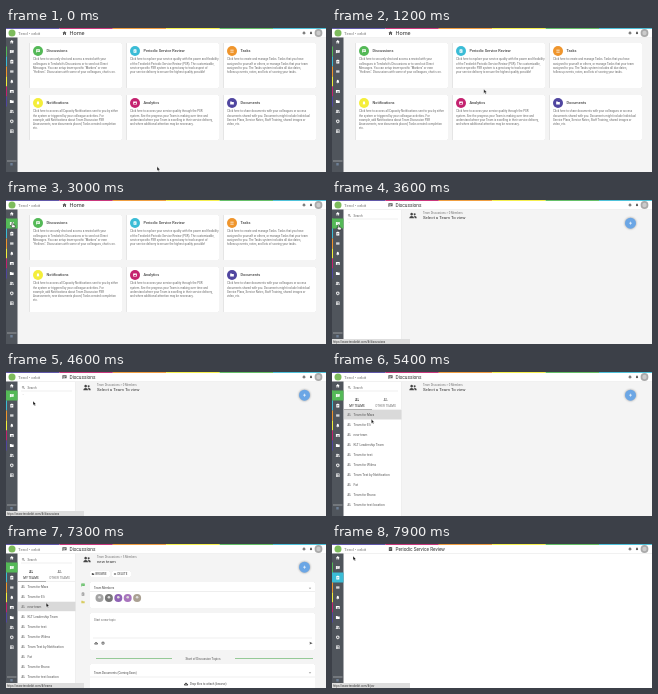
Write an HTML page that moves like this. It is 320 px wide and 144 px high and loops after 8000 ms.

```html
<!DOCTYPE html>
<html lang="en">
<head>
<meta charset="utf-8">
<title>Team portal</title>
<style>
html, body { margin: 0; width: 100%; height: 100%; overflow: hidden; background: #fff; }
svg { display: block; width: 320px; height: 144px; font-family: Roboto, Arial, sans-serif; }
.card { fill: #fff; filter: drop-shadow(0 .5px .7px #0005); }
.lift { filter: drop-shadow(0 1.2px 1.8px #0009); }
.line { stroke: #ddd; stroke-width: .5; }
</style>
</head>
<body>
<svg id="stage" viewBox="0 0 320 144"></svg>
<script>
const LOOP = 8000;
const stage = document.getElementById('stage');
const green = '#54b957', cyan = '#3bbcd6', orange = '#ef952c',
      yellow = '#f4ee3a', magenta = '#c4226f', purple = '#5046a0';
const hues = [green, cyan, orange, yellow, magenta, purple];

const rect = (x, y, w, h, fill, extra = '') =>
  `<rect x="${x}" y="${y}" width="${w}" height="${h}" fill="${fill}" ${extra}/>`;
const card = (x, y, w, h, cls = '') =>
  `<rect class="card ${cls}" x="${x}" y="${y}" width="${w}" height="${h}" rx=".8"/>`;
const dot = (x, y, r, fill, extra = '') =>
  `<circle cx="${x}" cy="${y}" r="${r}" fill="${fill}" ${extra}/>`;
const text = (x, y, size, str, fill = '#444', extra = '') =>
  `<text x="${x}" y="${y}" font-size="${size}" fill="${fill}" ${extra}>${str}</text>`;
const line = (x, y, x2) => `<path class="line" d="M${x} ${y}H${x2}"/>`;
const group = (id, body) => `<g id="${id}">${body}</g>`;

// Icons sit on a 24-unit grid.
const shapes = {
  home: 'M2 12 12 3 22 12H19V21H14V15H10V21H5V12Z',
  chat: 'M2 3H22V18H7L2 22ZM6 7V9H18V7ZM6 12V14H15V12Z',
  plan: 'M4 4H8V2H16V4H20V22H4ZM7 9V11H17V9ZM7 14V16H14V14Z',
  list: 'M3 5H21V8H3ZM3 11H21V14H3ZM3 17H21V20H3Z',
  bell: 'M12 2C7 3 6 7 6 11V16L4 19H20L18 16V11C18 7 17 3 12 2ZM10 20H14L12 23Z',
  chart: 'M2 4H22V20H2ZM5 17H19L14 9 10 14 8 12Z',
  folder: 'M2 4H10L12 7H22V20H2Z',
  people: 'M8 4A4 4 0 1 1 7.9 4ZM17 5A3 3 0 1 1 16.9 5ZM1 20C1 11 15 11 15 20ZM17 20C17 17 16 15 15 14C20 12 23 15 23 20Z',
  gear: 'M10 2H14L15 5 18 4 21 8 19 11 22 14 19 19 16 18 14 22H10L8 18 5 19 2 15 5 12 3 8 6 4 9 5ZM12 8A4 4 0 1 0 12.1 8Z',
  grid: 'M3 3H21V21H3ZM6 6V11H11V6ZM13 6V11H18V6ZM6 13V18H11V13ZM13 13V18H18V13Z',
  search: 'M10 2A8 8 0 1 0 10.1 2ZM10 5A5 5 0 1 1 9.9 5ZM15 17 17 15 23 21 21 23Z',
  send: 'M2 3 23 12 2 21 5 12Z',
  cloud: 'M6 20C0 20 0 11 6 11C7 3 17 3 18 10C25 10 25 20 19 20ZM12 10 8 15H11V18H13V15H16Z',
  down: 'M5 8 12 15 19 8 21 10 12 19 3 10Z'
};
const icon = (name, x, y, size, fill = '#555') =>
  `<path transform="translate(${x - size / 2} ${y - size / 2}) scale(${size / 24})" fill="${fill}" fill-rule="evenodd" d="${shapes[name]}"/>`;

const tiles = [
  ['Discussions', 'chat', [
    'Click here to securely chat and access a rewind with your',
    "colleagues in Tendorbit's Discussions or to send out Direct",
    'Messages. You can setup team-specific "Markers" or even',
    '"Hotlines". Discussions with some of your colleagues, chat is on.']],
  ['Periodic Service Review', 'plan', [
    'Click here to explore your service quality with the power and flexibility',
    'of the Tendorbit Periodic Service Review (PSR). The customizable,',
    'service-specific PSR system is a great way to track aspect of',
    'your service delivery to ensure the highest quality possible!']],
  ['Tasks', 'list', [
    'Click here to create and manage Tasks. Tasks that you have',
    'assigned to yourself or others, or manage Tasks that your team',
    'assigned to you. The Tasks system includes all due dates,',
    'follow up events, notes, and lots of scoring your tasks.']],
  ['Notifications', 'bell', [
    'Click here to access all Capacity Notifications sent to you by either',
    'the system or triggered by your colleague activities. For',
    'example, add Notifications about Team Discussion PSR',
    'Assessments, new documents placed, Tasks created completion',
    'etc.']],
  ['Analytics', 'chart', [
    'Click here to access your service quality through the PSR',
    'system. See the progress your Team is making over time and',
    'understand where your Team is excelling in their service delivery,',
    'and where additional attention may be necessary.']],
  ['Documents', 'folder', [
    'Click here to share documents with your colleagues or access',
    'documents shared with you. Documents might include Individual',
    'Service Plans, Service Notes, Staff Training, shared images or',
    'video, etc.']]
];

function tile([title, glyph, rows], i) {
  const x = 23.5 + i % 3 * 97, y = i < 3 ? 15 : 67;
  return (i === 1 ? group('hover', card(x, y, 92.5, 45, 'lift')) : '') +
    card(x, y, 92.5, 45) +
    dot(x + 8.5, y + 8, 5, hues[i]) + icon(glyph, x + 8.5, y + 8, 4.4, '#fff') +
    text(x + 17, y + 9.3, 3.85, title, '#444', 'font-weight="500"') +
    rows.map((row, n) => text(x + 3.5, y + 17.3 + n * 4.2, 2.9, row, '#666')).join('');
}

const heading = (id, glyph, label, size = 4.8) =>
  group(id, icon(glyph, 58.5, 5, 5) + text(63.5, 6.8, size, label, '#333'));

const fab = dot(298.5, 23.2, 5.5, '#6ba6e5', 'style="filter:drop-shadow(0 .7px .8px #0006)"') +
  '<path d="M297 23.2H300M298.5 21.7V24.7" stroke="#fff" stroke-width=".6"/>';

const teamHead = (count, name) => icon('people', 81, 15.5, 8, '#444') +
  text(91, 13.5, 2.8, `Team Discussions &gt; ${count} Members`, '#777') +
  text(91, 18.6, 4.3, name, '#333');

const teams = ['Team for Mara', 'Team for Eli', 'new team', 'KLT Leadership Team', 'Team for test',
  'Team for Wilma', 'Team Test by Notification', 'Fat', 'Team for Bruno', 'Team for test location'];

const teamList = icon('people', 25, 27.5, 4.5, '#777') + icon('people', 53.5, 27.5, 4.5, '#999') +
  text(25, 35.2, 3.1, 'MY TEAMS', '#333', 'text-anchor="middle"') +
  text(53.5, 35.2, 3.1, 'OTHER TEAMS', '#777', 'text-anchor="middle"') +
  line(12, 37.4, 69) + rect(12, 37, 28, .6, '#888') +
  rect(12, 38, 57.5, 9.5, '#d9d9d9', 'id="row"') +
  teams.map((name, i) => icon('people', 17, 42.4 + i * 10, 3.8, '#888') +
    text(21.5, 43.6 + i * 10, 3.2, name, '#555')).join('');

const button = (x, w, glyph, label) => card(x, 27, w, 6) +
  icon(glyph, x + 3, 30, 2.8) + text(x + 5.5, 31.1, 2.8, label, '#333');

const teamPage = teamHead(5, 'new team') +
  button(84, 20, 'folder', 'BROWSE') + button(106, 19, 'grid', 'DELETE') +
  icon('chat', 77, 41, 4, green) + icon('plan', 77, 50, 4, '#999') + icon('folder', 77, 58, 4, '#d8cc62') +
  card(84, 38, 225, 26) + text(88, 45, 2.9, 'Team Members') + icon('down', 304, 44, 3) + line(84, 47.5, 309) +
  ['#a3a3a3', '#777', '#8f62b5', '#a874bd', '#aaa092'].map((fill, i) =>
    dot(93.5 + i * 9.4, 54, 4, fill) + dot(93.5 + i * 9.4, 53.2, 1.3, '#ddd')).join('') +
  card(84, 69, 225, 37) + text(88, 77, 2.9, 'Start a new topic', '#666') + line(87, 94, 306) +
  icon('cloud', 90, 99.2, 4) + icon('gear', 97, 99.2, 4) + icon('send', 305, 99.2, 3.6) +
  rect(90, 114, 76, .9, '#8cc68e') + rect(229, 114, 78, .9, '#8cc68e') +
  text(197, 115.6, 3, 'Start of Discussion Topics', '#555', 'text-anchor="middle"') +
  card(84, 120, 225, 28) + text(88, 129.5, 2.9, 'Team Documents (Coming Soon)') +
  icon('down', 304, 128.5, 3) + line(84, 133, 309) +
  icon('cloud', 180, 140, 4.5, '#444') + text(184, 141.2, 2.9, 'Drop files to attach (browse)');

const sideIcons = ['home', 'chat', 'plan', 'list', 'bell', 'chart', 'folder', 'people', 'gear', 'grid'];
const sidebar = rect(0, 9.5, 11.5, 134.5, '#50555c') +
  rect(0, 18.5, 11.5, 10, green, 'id="active"') +
  hues.map((hue, i) => rect(0, 18.5 + i * 10, 1, 10, hue)).join('') +
  sideIcons.map((name, i) => icon(name, 5.8, 13.7 + i * 9.95, 4.5, '#fff')).join('') +
  line(1, 133, 10.5) + icon('list', 5.5, 136.5, 3.2, '#8ba9cf');

const header = rect(0, 0, 320, 9.8, '#fff', 'style="filter:drop-shadow(0 .4px .5px #0005)"') +
  [purple, magenta, orange, yellow, green, cyan].map((hue, i) => rect(i * 53.4, 0, 53.4, .9, hue)).join('') +
  dot(6, 5, 3.5, '#7dbb5c') + text(12, 6.5, 4.4, 'Tend • orbit', '#777') +
  icon('gear', 298, 5, 3.6) + icon('bell', 305, 5, 3.6) + dot(312.5, 5, 3.9, '#aaa') + dot(312.5, 5, 2.2, '#ccc');

stage.innerHTML = rect(0, 0, 320, 144, '#f4f4f4') +
  group('home', tiles.map(tile).join('')) +
  group('talk', rect(11, 10, 58.5, 134, '#fff') + rect(69.3, 10, .4, 134, '#ddd') +
    icon('search', 17.3, 15.4, 3.4, '#666') + text(21.5, 16.5, 3, 'Search', '#666') + line(15, 19, 66) +
    group('wait', text(16, 22.8, 3, '...', '#999')) +
    group('pick', teamHead(0, 'Select a Team To view')) +
    group('list', teamList) + group('team', teamPage) + fab) +
  group('review', rect(11, 10, 309, 134, '#fff')) +
  header + heading('homeHead', 'home', 'Home', 5.6) + heading('talkHead', 'chat', 'Discussions') +
  heading('reviewHead', 'plan', 'Periodic Service Review', 4.7) + sidebar +
  group('status', rect(0, 139, 78, 5, '#dedede') + text(1, 142.5, 2.8, '', '#333', 'id="link"')) +
  group('cursor', '<path id="arrow" d="M0 0V4.3L1 3.4 1.8 5 2.5 4.7 1.8 3.2H3.1Z" fill="#111" stroke="#fff" stroke-width=".4"/>' +
    '<path id="hand" d="M0 0C.7-.5 1 .1 1 .7V2L3 2.5Q3.5 3 3 5H.3L-1.3 2.8-.7 2.4 0 3Z" fill="#fff" stroke="#111" stroke-width=".5"/>');

const el = Object.fromEntries([...stage.querySelectorAll('[id]')].map(node => [node.id, node]));
const show = (id, on) => { el[id].style.display = on ? '' : 'none'; };

// time, x, y
const path = [[0, 151, 138.5], [500, 151, 138.5], [1500, 152, 40], [2150, 153, 38.5], [2700, 6, 22],
  [3700, 6, 25], [4300, 27, 29], [4900, 27, 29], [5800, 48, 60], [6700, 48, 60],
  [7250, 43, 61], [7550, 6, 33], [7700, 6, 33], [7880, 21, 12], [8000, 21, 12]];

function pointer(t) {
  const i = path.findIndex(p => p[0] > t);
  const [t0, x0, y0] = path[i - 1], [t1, x1, y1] = path[i];
  const u = (t - t0) / (t1 - t0), k = u * u * (3 - 2 * u);
  return [x0 + (x1 - x0) * k, y0 + (y1 - y0) * k];
}

function draw(t) {
  const page = t < 3200 ? 'home' : t < 7600 ? 'talk' : 'review';
  for (const name of ['home', 'talk', 'review']) {
    show(name, name === page);
    show(name + 'Head', name === page);
  }
  const [x, y] = pointer(t);
  const overCard = page === 'home' && x > 120 && x < 214 && y > 15 && y < 60;
  const overMenu = x < 11.5;
  show('hover', overCard);
  show('hand', overCard || overMenu);
  show('arrow', !overCard && !overMenu);
  el.cursor.setAttribute('transform', `translate(${x} ${y})`);
  show('wait', t < 5000);
  show('pick', t < 5700);
  show('list', t >= 5000);
  show('team', t >= 6600);
  el.row.setAttribute('y', t < 6600 ? 38 : 57.7);
  show('active', page !== 'home' || overMenu);
  el.active.setAttribute('y', page === 'review' ? 28.5 : 18.5);
  el.active.setAttribute('fill', page === 'review' ? cyan : green);
  show('status', t >= 3200 && t < 5000 || t >= 7200);
  el.link.textContent = 'https://www.tendorbit.com/#/' +
    (page === 'review' ? 'psr' : t < 5000 ? 'discussions' : 'teams');
}

const start = performance.now();
function tick() {
  draw((performance.now() - start) % LOOP);
  requestAnimationFrame(tick);
}
tick();
</script>
</body>
</html>
```
